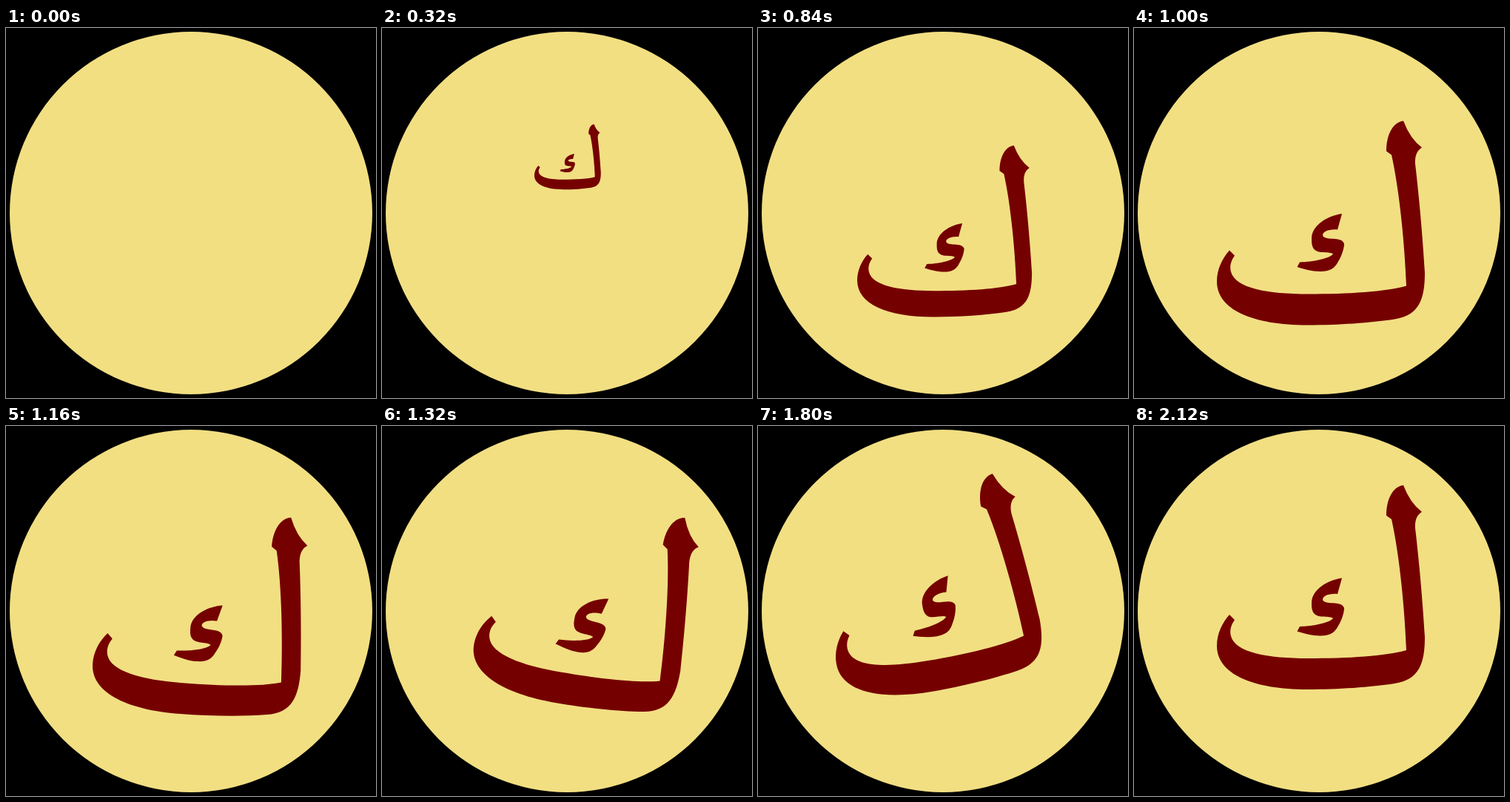
These frames come from a looping animation (500 by 500 pixels, 2800 ms). An HTML page:

```html
<!DOCTYPE html>
<html lang="ar">
<head>
<meta charset="utf-8">
<title>Letter kaf</title>
<style>
  html, body { margin: 0; width: 100%; height: 100%; overflow: hidden; background: #000; }
  svg { display: block; width: 100%; height: 100%; }
  circle { fill: #f2df82; }
  path { fill: #750000; }
</style>
</head>
<body>
<svg viewBox="0 0 500 500" role="img" aria-label="ك">
  <circle cx="250" cy="250" r="245"/>
  <g id="letter">
    <path d="M364 80 Q373 104 389 116 Q379 122 380 138 C385 180 390 235 393 285
      C393 320 386 343 352 348 C320 353 275 356 235 356 C160 356 112 335 112 297
      C112 281 119 266 129 255 L136 262 C131 269 129 276 131 284
      C137 306 180 314 235 314 C290 314 340 311 368 303
      C366 250 359 175 348 126 L341 121 C341 100 349 82 364 80Z"/>
    <path d="M281 205.500 L275 227 C263 226 255 230 255 234.500
      C257 243 281 235 284 246 C284 252 281 262 276 270
      C271 280 264 283.500 252 283.500 C240 283.500 229 280 220.500 277.500
      L224 271 C242 270.500 264 266 269 260 C265 256 250 260 244 254
      C240 250 240 244 240 239 C240 221 262 208 281 205.500Z"/>
  </g>
</svg>
<script>
  const LOOP = 2800, STEP = 40;
  const PIVOT = { x: 250, y: 349 };
  const DROP_END = 1000, DROP_HEIGHT = 386, OVERSHOOT = 45.5;

  // Swing after the drop: time, shift x, shift y, angle
  const swing = [
    [DROP_END, 0, OVERSHOOT, 0],
    [1340, 1.5, 20.6, 9.8],
    [1800, 0.8, 0, -9.9],
    [2120, 0, 0, 0]
  ];

  const letter = document.getElementById('letter');
  const easeInOut = p => (1 - Math.cos(Math.PI * p)) / 2;

  function pose(t) {
    if (t < DROP_END) {
      const p = t / DROP_END;
      return [0, OVERSHOOT - DROP_HEIGHT * (1 - p) ** 2, 0, p];
    }
    const i = swing.findIndex(key => t < key[0]);
    if (i < 0) return [0, 0, 0, 1];
    const a = swing[i - 1], b = swing[i];
    const p = easeInOut((t - a[0]) / (b[0] - a[0]));
    const [, x, y, angle] = a.map((v, n) => v + (b[n] - v) * p);
    return [x, y, angle, 1];
  }

  function draw(t) {
    const [x, y, angle, scale] = pose(t);
    letter.setAttribute('transform',
      `translate(${PIVOT.x + x} ${PIVOT.y + y}) rotate(${angle}) scale(${scale}) ` +
      `translate(${-PIVOT.x} ${-PIVOT.y})`);
  }

  const start = performance.now();
  function tick() {
    const t = (performance.now() - start) % LOOP;
    draw(Math.floor(t / STEP) * STEP);
    requestAnimationFrame(tick);
  }
  draw(0);
  requestAnimationFrame(tick);
</script>
</body>
</html>
```
